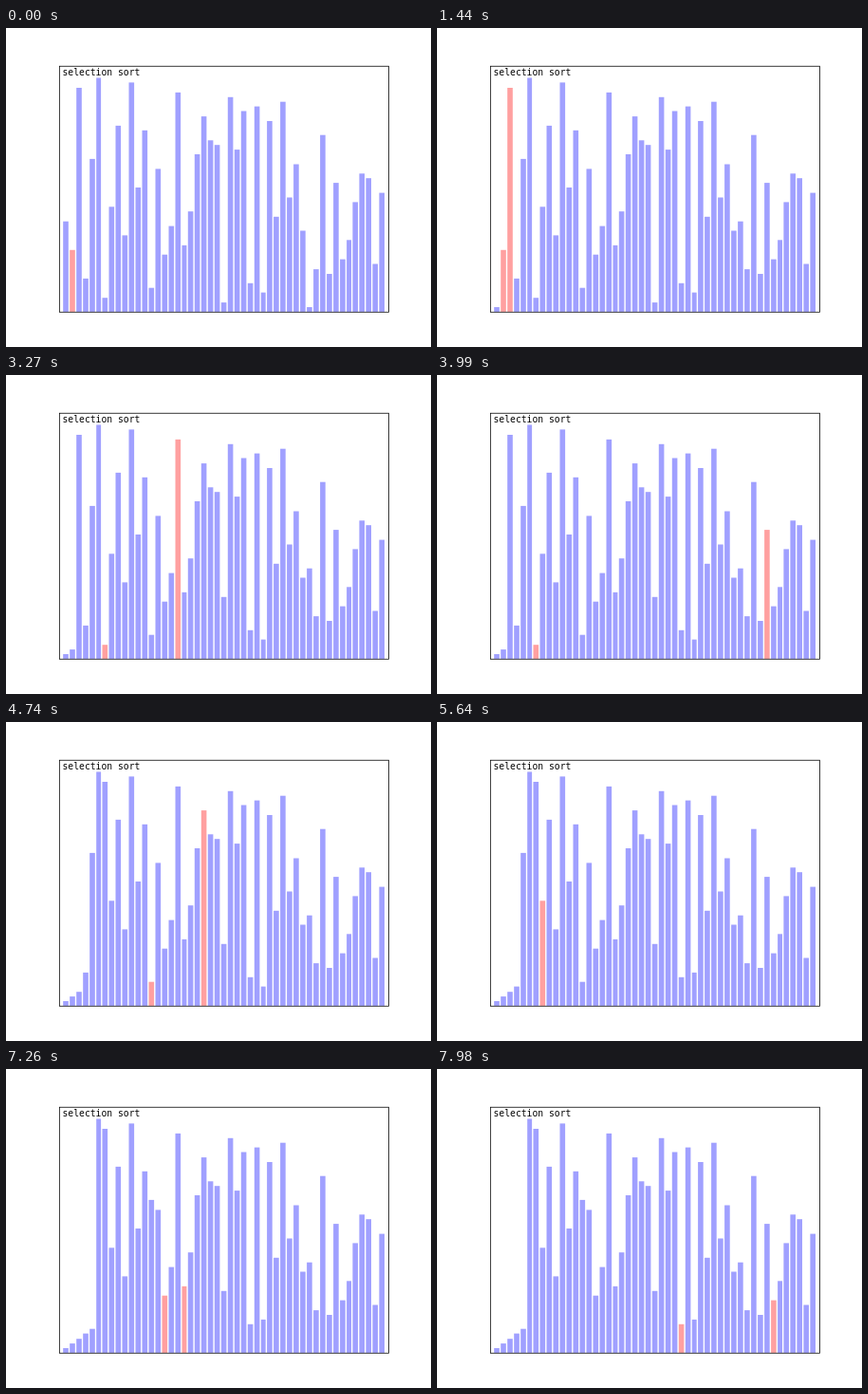
Animation, 448 px wide and 336 px high, one loop 8 s. Source, as an HTML page:

```html
<!DOCTYPE html>
<html lang="en">
<head>
<meta charset="utf-8">
<title>Selection sort</title>
<style>
  html, body { margin: 0; width: 100%; height: 100%; overflow: hidden; background: #fff; }
  svg { display: block; width: 100vw; height: 100vh; }
  text { font: 13.89px "DejaVu Sans Mono", monospace; }
</style>
</head>
<body>
<svg viewBox="0 0 640 480">
  <g id="bars"></g>
  <rect x="80.5" y="57.5" width="496" height="370" fill="none" stroke="#000" stroke-width="1.11"/>
  <text x="85" y="72">selection sort</text>
</svg>
<script>
const LOOP = 8000, STEP = 30;
const BLUE = '#a0a0ff', RED = '#ffa0a0';
const START = [
  19, 13, 47, 7, 32, 49, 3, 22, 39, 16, 48, 26, 38, 5, 30, 12, 18, 46, 14, 21, 33, 41, 36, 35, 2,
  45, 34, 42, 6, 43, 4, 40, 20, 44, 24, 31, 17, 1, 9, 37, 8, 27, 11, 15, 23, 29, 28, 10, 25
];

// Plot area in viewBox units: 50 columns wide, 5% headroom above the tallest bar.
const LEFT = 80, BASE = 427.2, COLUMN = 496 / 50, UNIT = 369.6 / (START.length * 1.05);
const columnX = c => Math.round(LEFT + c * COLUMN);

const bars = START.map((_, i) => {
  const bar = document.createElementNS('http://www.w3.org/2000/svg', 'rect');
  const x = columnX(i + 0.6);
  bar.setAttribute('x', x);
  bar.setAttribute('width', columnX(i + 1.4) - x);
  document.getElementById('bars').append(bar);
  return bar;
});

// One state per comparison: the values, the smallest so far and the bar being checked.
function* selectionSort(values) {
  const a = [...values];
  for (let i = 0; i < a.length - 1; i++) {
    let min = i;
    for (let j = i + 1; j < a.length; j++) {
      if (a[j] < a[min]) min = j;
      yield { values: [...a], min, j };
    }
    [a[i], a[min]] = [a[min], a[i]];
  }
}

const states = [];
for (const state of selectionSort(START)) {
  states.push(state);
  if (states.length * STEP >= LOOP) break;
}

let shown = -1;
function draw(step) {
  if (step === shown) return;
  shown = step;
  const { values, min, j } = states[step];
  bars.forEach((bar, i) => {
    const y = Math.round(BASE - values[i] * UNIT);
    bar.setAttribute('y', y);
    bar.setAttribute('height', Math.round(BASE) - y);
    bar.setAttribute('fill', i === min || i === j ? RED : BLUE);
  });
}

const begin = performance.now();
function tick() {
  draw(Math.floor((performance.now() - begin) % LOOP / STEP));
  requestAnimationFrame(tick);
}
tick();
</script>
</body>
</html>
```
